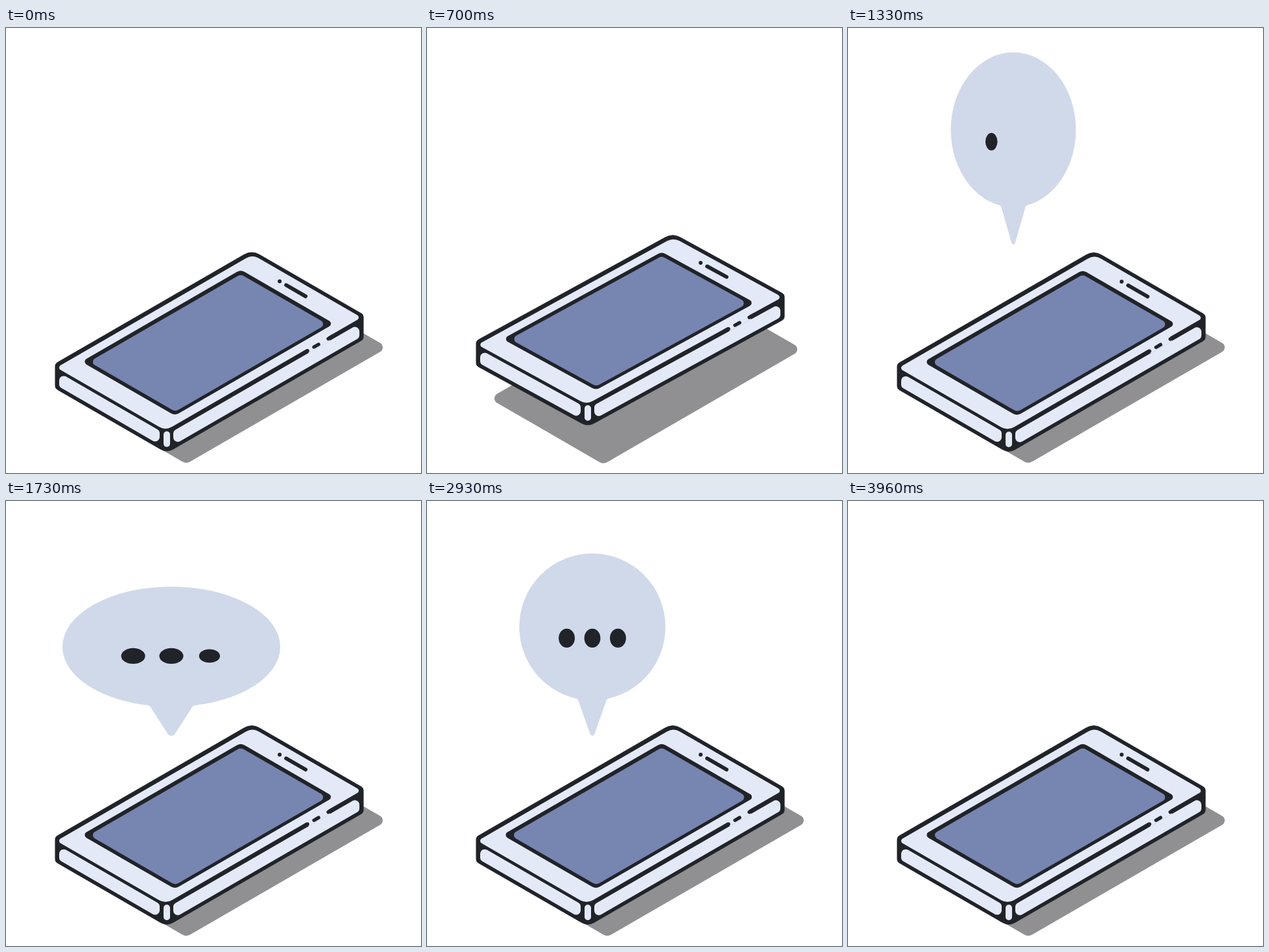
Recreate the animation shown at these times as an HTML page with a canvas. Size 640 px wide and 686 px high, loop 4 s.

```html
<!DOCTYPE html>
<html lang="en">
<head>
<meta charset="utf-8">
<title>Phone message</title>
<style>
  html, body { margin: 0; width: 100%; height: 100%; overflow: hidden; background: #fff; }
  canvas { display: block; }
</style>
</head>
<body>
<canvas id="stage" width="640" height="686"></canvas>
<script>
const ctx = document.getElementById('stage').getContext('2d');
const LOOP = 4000;
const INK = '#202328', BODY = '#e4e9f7', SCREEN = '#7785b1', BUBBLE = '#d0d9ea', SHADE = '#909092';
const LENGTH = 303, WIDTH = 172, DEPTH = 38;

const clamp = v => Math.max(0, Math.min(1, v));
const smooth = v => (1 - Math.cos(Math.PI * clamp(v))) / 2;
// One half sine wave, zero outside its span
const bump = (t, start, span) => Math.sin(Math.PI * clamp((t - start) / span));

// Isometric view: u runs along the phone, v across it, z upwards.
const view = { x: 76, y: 518, tilt: 1 };
const iso = (u, v, z = 0) => [
  view.x + u + v,
  view.y + (v - u) * view.tilt / Math.sqrt(3) - z,
];

// Each corner is [[x, y], radius].
function shape(color, corners, outline = 0) {
  const middle = i => {
    const [a] = corners[i], [b] = corners[(i + 1) % corners.length];
    return [(a[0] + b[0]) / 2, (a[1] + b[1]) / 2];
  };
  ctx.beginPath();
  ctx.moveTo(...middle(corners.length - 1));
  corners.forEach(([point, radius], i) => ctx.arcTo(...point, ...middle(i), radius));
  ctx.closePath();
  ctx.fillStyle = ctx.strokeStyle = color;
  ctx.fill();
  ctx.lineWidth = outline;
  if (outline) ctx.stroke();
}

function panel(color, u0, v0, u1, v1, z, sharp, blunt) {
  shape(color, [
    [iso(u0, v0, z), sharp], [iso(u1, v0, z), blunt],
    [iso(u1, v1, z), sharp], [iso(u0, v1, z), blunt],
  ]);
}

function side(u0, v0, u1, v1) {
  shape(BODY, [
    iso(u0, v0, -10.3), iso(u1, v1, -10.3), iso(u1, v1, 6 - DEPTH), iso(u0, v0, 6 - DEPTH),
  ].map(point => [point, 7]));
}

function line(color, width, from, to, cap = 'round') {
  ctx.beginPath();
  ctx.moveTo(...from);
  ctx.lineTo(...to);
  ctx.strokeStyle = color;
  ctx.lineWidth = width;
  ctx.lineCap = cap;
  ctx.stroke();
}

function oval(color, x, y, rx, ry = rx) {
  ctx.beginPath();
  ctx.ellipse(x, y, rx, ry, 0, 0, 2 * Math.PI);
  ctx.fillStyle = color;
  ctx.fill();
}

function drawShadow(t) {
  const air = clamp(Math.min(t, 1260 - t) / 300);
  const grow = 4 - 2 * air;
  Object.assign(view, { x: 106 - 6 * air, y: 530 + 3 * air, tilt: 1 });
  panel(SHADE, -grow, -grow, LENGTH + grow, WIDTH + grow, -DEPTH, 8, 12);
}

function drawPhone(t) {
  const lift = 53 * bump(t, 0, 360) + 36 * bump(t, 360, 748);
  Object.assign(view, { x: 76, y: 518 - lift, tilt: 1 - .088 * bump(t, 560, 700) });

  shape(INK, [
    [iso(0, 0), 6], [iso(LENGTH, 0), 24], [iso(LENGTH, WIDTH), 6],
    [iso(LENGTH, WIDTH, -DEPTH), 6], [iso(0, WIDTH, -DEPTH), 20], [iso(0, 0, -DEPTH), 6],
  ], 1);
  panel(BODY, 1, 1, LENGTH, WIDTH - 3, -6, 4, 20);
  side(10, WIDTH, LENGTH - 6, WIDTH);
  side(0, 6, 0, WIDTH - 11);

  const [x, y] = iso(0, WIDTH);
  const rim = [[-5, 5], [5, 5], [5, 29], [-5, 29]];
  shape(BODY, rim.map(([dx, dy]) => [[x + dx, y + dy], 5]));

  // Broken edge between the top and the side
  const edge = u => iso(u, WIDTH, -6);
  line(BODY, 8, edge(217), edge(250), 'butt');
  for (const [from, to] of [[211, 217], [227, 234], [249, 257]]) line(INK, 5.4, edge(from), edge(to));

  panel(INK, 23, 17.5, 268.5, 161.5, 0, 5, 12);
  panel(SCREEN, 28.5, 23.5, 262.5, 156.5, 0, 6, 10);
  oval(INK, ...iso(283, 63), 3);
  line(INK, 5.8, iso(283, 73), iso(283, 103));
}

function dotRadius(t, index) {
  const clock = t - 1270;
  if (clock < 0) return 0;
  const age = clock % 1080, delay = 200 * index;
  return 14 * clamp(Math.min((age - delay) / 70, (900 - age) / 100));
}

function drawBubble(t) {
  const size = smooth((t - 1110) / 110) * (1 - smooth((t - 2930) / 260));
  if (size <= 0) return;
  const squash = .57 * bump(t, 1440, 360) - .427 * bump(t, 1080, 310)
    - .13 * bump(t, 1800, 240) - .17 * bump(t, 2700, 300);

  ctx.save();
  ctx.translate(255, 362 - 30 * bump(t, 1110, 360));
  ctx.scale(size * (1 + squash), size * (1 - .44 * squash));
  oval(BUBBLE, 0, -160, 127, 108);
  ctx.fill(new Path2D('M-42-62Q-27-58-24-51L-4-3Q0 3 4-3L24-51Q27-58 42-62Z'));
  for (let i = 0; i < 3; i++) oval(INK, (i - 1) * 44.5, -143.5, dotRadius(t, i));
  ctx.restore();
}

function draw(t) {
  ctx.fillStyle = '#fff';
  ctx.fillRect(0, 0, 640, 686);
  drawShadow(t);
  drawPhone(t);
  drawBubble(t);
}

const start = performance.now();
function frame() {
  draw((performance.now() - start) % LOOP);
  requestAnimationFrame(frame);
}
frame();
</script>
</body>
</html>
```
